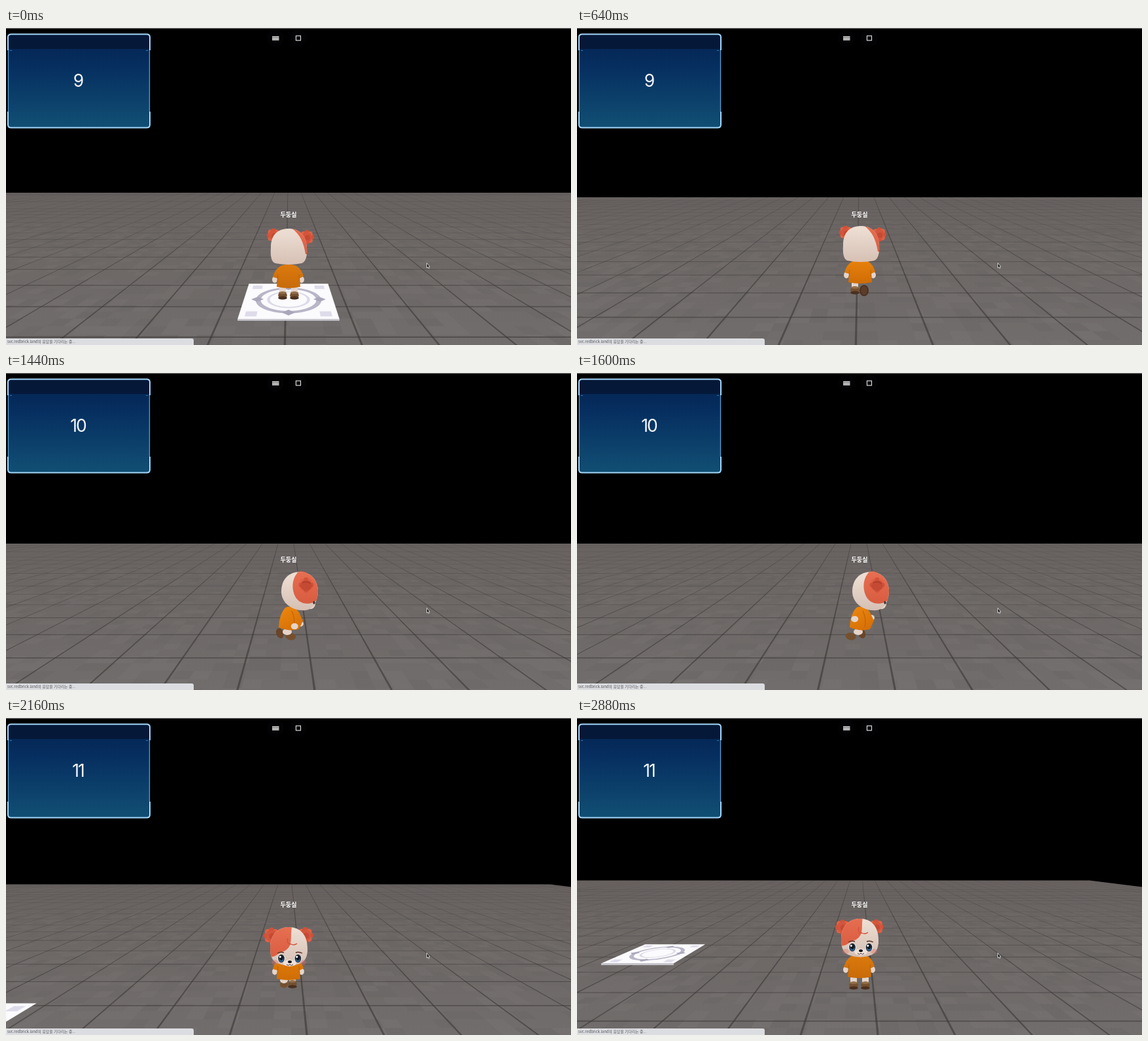
Write an HTML page with a canvas that moves like this. It is 864 px wide and 485 px high and loops after 2960 ms.

```html
<!DOCTYPE html>
<html lang="ko">
<head>
<meta charset="utf-8">
<title>Runner</title>
<style>
html, body { margin: 0; width: 100%; height: 100%; overflow: hidden; background: #000; }
#stage { position: relative; width: 864px; height: 485px; overflow: hidden; font-family: "Noto Sans CJK KR", "Noto Sans CJK", sans-serif; }
canvas, svg { position: absolute; left: 0; top: 0; }
#count { font: 400 26.5px Inter, sans-serif; fill: #f4f7fb; text-anchor: middle; letter-spacing: -2px; }
#name { position: absolute; left: 392px; top: 279px; width: 80px; text-align: center; font-size: 9px; line-height: 13px; font-weight: 700; color: #fff; }
#status { position: absolute; left: 0; top: 475px; width: 285px; height: 10px; padding-left: 2px; background: #dcdde1; border-radius: 0 3px 0 0; font-size: 5.8px; line-height: 10px; color: #55565a; white-space: nowrap; }
</style>
</head>
<body>
<div id="stage">
<canvas id="scene" width="864" height="485"></canvas>
<svg width="864" height="485">
  <defs>
    <linearGradient id="glass" x2="0" y2="1">
      <stop stop-color="#04224f"/><stop offset=".35" stop-color="#062f60"/><stop offset="1" stop-color="#114f74"/>
    </linearGradient>
  </defs>
  <path d="M0 .5H864" stroke="#777"/>
  <rect x="3" y="9" width="217" height="144" rx="5" fill="url(#glass)"/>
  <path d="M3 32V14Q3 9 8 9H215Q220 9 220 14V32Z" fill="#051838"/>
  <path d="M3.5 32V128M219.5 32V128" stroke="#5aa0d4" stroke-width="1.3"/>
  <path d="M3 34V14Q3 9.500 8 9.500H215Q220 9.500 220 14V34M3 128V148Q3 152.500 8 152.500H215Q220 152.500 220 148V128" fill="none" stroke="#a5d8fb" stroke-width="2"/>
  <path d="M6 34.500H9M214 34.500H217" stroke="#2e79b5"/>
  <text id="count" x="110" y="90">9</text>
  <g fill="#030305"><circle cx="412" cy="15.500" r="13"/><circle cx="447" cy="15.500" r="13"/></g>
  <path d="M407 13.500H417.500M407 15.700H417.500M407 17.900H417.500" stroke="#fff" stroke-width="1.5"/>
  <rect x="443.500" y="12" width="7" height="7" fill="none" stroke="#ddd" stroke-width="1.2"/>
  <path d="M643.500 359.500V367L645 365.700L646 368L647.300 367.400L646.300 365.200H648Z" fill="#111" stroke="#fff" stroke-width=".7"/>
</svg>
<div id="name">두둥실</div>
<div id="status">svc.redbrick.land의 응답을 기다리는 중...</div>
</div>
<script>
const ctx = document.getElementById('scene').getContext('2d');
const count = document.getElementById('count');
const LOOP = 2960, STEP = 80, SPEED = 0.0023;
const FOCAL = 540, VANISH = 204, DIST = 2.56, CELL = 0.42, EDGE = 8.69, SIDE = 9.9;
const CREAM = '#e5d4c9', SHADE = '#cbb4a8', RED = '#df6246', DARK_RED = '#c44a33', BOOT = '#75502f', SOLE = '#4a3020';
const clamp = (v, lo, hi) => Math.max(lo, Math.min(hi, v));
let camX = 0, camZ = 0;

// Floor point to screen
function project(x, z) {
  const depth = Math.max(0.05, z - camZ + DIST);
  return [432 + FOCAL * (x - camX) / depth, VANISH + FOCAL / depth];
}
function poly(points, fill) {
  ctx.beginPath();
  points.forEach(([x, z]) => ctx.lineTo(...project(x, z)));
  ctx.closePath();
  ctx.fillStyle = fill;
  ctx.fill();
}
const quad = (x, z, w, d, fill) => poly([[x, z], [x + w, z], [x + w, z + d], [x, z + d]], fill);
function noise(i, j) {
  const n = Math.sin(i * 127.1 + j * 311.7) * 43758.5453;
  return n - Math.floor(n);
}

function floor() {
  const near = camZ - DIST + 1.8;
  ctx.save();
  ctx.beginPath();
  [[-SIDE, near], [-SIDE, EDGE], [SIDE, EDGE], [SIDE, near]].forEach(([x, z]) => ctx.lineTo(...project(x, z)));
  ctx.clip();
  const tone = ctx.createLinearGradient(0, 250, 0, 485);
  tone.addColorStop(0, '#676160');
  tone.addColorStop(0.35, '#6c6765');
  tone.addColorStop(1, '#716d6c');
  ctx.fillStyle = tone;
  ctx.fillRect(0, 240, 864, 245);

  const sub = CELL / 4;
  for (let j = Math.floor(near / sub); j * sub < near + 4; j++) {
    const reach = (j * sub - camZ + DIST) * 0.82 + sub;
    for (let i = Math.floor((camX - reach) / sub); i * sub < camX + reach; i++) {
      const n = noise(i, j);
      if (n > 0.75) quad(i * sub, j * sub, sub, sub, 'rgba(255,240,230,.02)');
      else if (n < 0.2) quad(i * sub, j * sub, sub, sub, 'rgba(20,15,15,.025)');
    }
  }
  const phase = 0.28;
  for (let k = Math.floor((near - phase) / CELL); k * CELL < EDGE; k++) {
    quad(camX - SIDE * 2, k * CELL + phase, SIDE * 4, 0.017, 'rgba(52,48,47,.45)');
  }
  for (let x = -23 * CELL - 0.02; x < SIDE; x += CELL) {
    quad(x - 0.006, near, 0.012, EDGE - near, 'rgba(58,54,53,.6)');
  }
  ctx.restore();
}

function ring(r, width, fill) {
  ctx.beginPath();
  for (const radius of [r, r - width]) {
    for (let i = 0; i <= 48; i++) {
      const a = i * Math.PI / 24;
      const p = project(radius * Math.cos(a), radius * Math.sin(a));
      i ? ctx.lineTo(...p) : ctx.moveTo(...p);
    }
  }
  ctx.fillStyle = fill;
  ctx.fill('evenodd');
}
function pad() {
  const h = 0.323;
  const [x, y] = project(-h, -h), [right] = project(h, -h);
  if (y > 640) return;
  ctx.fillStyle = '#c5c4cc';
  ctx.fillRect(x, y, right - x, 2.5);
  quad(-h, -h, 2 * h, 2 * h, '#fbfafd');
  for (const sx of [-1, 1]) for (const sz of [-1, 1]) quad(sx * 0.245 - 0.038, sz * 0.245 - 0.038, 0.076, 0.076, '#dedbea');
  ring(0.237, 0.036, '#b9b6c8');
  ring(0.155, 0.02, '#dddae8');
  for (const [cx, cz] of [[0, 0.225], [0, -0.225], [0.225, 0], [-0.225, 0]]) {
    poly([[cx - 0.045, cz], [cx, cz + 0.045], [cx + 0.045, cz], [cx, cz - 0.045]], '#aaa7bb');
  }
}

function oval(x, y, rx, ry, fill, turn = 0) {
  ctx.beginPath();
  ctx.ellipse(x, y, rx, ry, turn, 0, 7);
  ctx.fillStyle = fill;
  ctx.fill();
}
function shape(d, fill) {
  ctx.fillStyle = fill;
  ctx.fill(new Path2D(d));
}
function line(d, color, width) {
  ctx.strokeStyle = color;
  ctx.lineWidth = width;
  ctx.stroke(new Path2D(d));
}
// Draws moved by (x, y) and turned about the middle of the body
function shifted(x, y, draw, turn = 0) {
  ctx.save();
  ctx.translate(432 + x, 380 + y);
  ctx.rotate(turn);
  ctx.translate(-432, -380);
  draw();
  ctx.restore();
}
function blend(x0, y0, x1, y1, from, to) {
  const g = ctx.createLinearGradient(x0, y0, x1, y1);
  g.addColorStop(0, from);
  g.addColorStop(1, to);
  return g;
}
function ear(x, y, r) {
  for (let i = 0; i < 8; i++) {
    const a = i * Math.PI / 4;
    oval(x + r * 0.68 * Math.cos(a), y + r * 0.68 * Math.sin(a), r * 0.36, r * 0.36, i % 2 ? RED : '#d05139');
  }
  oval(x, y, r * 0.75, r * 0.75, '#d3553b');
  oval(x + 1, y + 1, r * 0.4, r * 0.4, DARK_RED);
}
function head(d, patch, drop = 0) {
  const outline = new Path2D(d);
  ctx.save();
  ctx.fillStyle = blend(0, 312, 0, 366, '#ecddd2', '#d5beb2');
  ctx.fill(outline);
  ctx.clip(outline);
  ctx.translate(0, drop);
  shape(patch, blend(0, 305, 0, 350, '#e76e51', '#d95d41'));
  ctx.restore();
}
function shirt(top = '#e8820c', bottom = '#cf6c06') {
  oval(411, 385, 4, 5, CREAM);
  oval(452, 385, 4, 5, CREAM);
  shape('M420 364Q432 359 444 364Q452 369 455 380L449 383L450 396Q432 400 414 396L415 383L408 381Q411 369 420 364Z', blend(0, 362, 0, 398, top, bottom));
  line('M416 377L415 388M448 377L449 388', '#b65c08', 0.8);
}
function boot(x, y) {
  ctx.fillStyle = CREAM;
  ctx.fillRect(x - 5, y - 12, 10, 9);
  oval(x, y, 6.8, 5.8, BOOT);
  oval(x, y + 4, 6.8, 2.5, SOLE);
  oval(x, y - 4, 6, 1.8, '#94704c');
}

function backHead() {
  ear(409, 317, 10);
  ear(460, 320, 10.5);
  head('M405 336C405 316 416 307 432 307S459 316 460 336C461 350 458 358 452 360Q432 364 412 360C406 358 404 350 405 336Z',
    'M433 304C447 312 455 325 458 346L472 346V300Z');
}
function back(run, s) {
  if (!run) {
    boot(423, 409);
    boot(441, 409);
    shirt('#dd7a0d', '#c76a0a');
    backHead();
    return;
  }
  const side = s < 0 ? -1 : 1, lift = Math.abs(s);
  boot(432 - side * 7, 401);
  shifted(1, -7, () => shirt());
  oval(432 + side * 7, 402 - lift, 7, 8 + 2 * lift, SOLE);
  oval(432 + side * 7, 402 - lift, 5, 6 + 2 * lift, '#5c3d29');
  shifted(2, -4, backHead);
}

function sideView(s, bob) {
  const swing = 9 * s;
  oval(427 - swing, 400 - 2 * Math.abs(s), 5.5, 8, '#6a4527', -0.35);
  oval(427 + swing, 403, 8, 5.5, BOOT, 0.2);
  oval(430, 396, 7, 5, CREAM);
  oval(450, 379 + 5 * s, 5, 4.5, CREAM);
  shape('M427 359Q440 354 448 366L454 379L448 392Q432 396 417 389Q418 369 427 359Z', blend(420, 360, 440, 395, '#ec860e', '#d56f05'));
  line('M437 364Q443 376 440 389', '#b95f08', 1);
  oval(433 + 9 * s, 382 + 6 * s, 5.5, 4.8, CREAM);
  shifted(0, bob, () => {
    oval(452, 308, 8, 4, DARK_RED);
    oval(465, 354, 8, 8, CREAM);
    head('M421 335C421 316 433 305 449 305C466 305 476 317 477 333C477 351 469 364 455 364C435 364 421 351 421 335Z',
      'M450 302C438 312 436 327 441 340C446 352 457 356 469 352L482 345V300Z');
    ear(459, 325, 11);
    oval(459, 326, 9, 8, DARK_RED);
    line('M453 322Q459 318 466 323', '#ac3c2b', 1.3);
    oval(471, 352, 1.5, 2.5, '#392d30');
  });
}

function eye(x, y) {
  oval(x, y, 5.8, 6.5, '#f7f1ee');
  oval(x, y, 4.8, 6.2, '#17222f');
  oval(x, y + 2, 3.2, 3.3, '#2f6c9b');
  oval(x, y, 2.3, 3, '#0d141d');
  oval(x - 1.7, y - 2.6, 1.5, 1.7, '#fff');
}
function face() {
  line('M431 320Q429 330 436 329M434 328Q440 332 445 328', '#d25237', 1.5);
  oval(411, 357, 5, 4, 'rgba(225,112,105,.38)');
  oval(454, 357, 5, 4, 'rgba(225,112,105,.38)');
  eye(421, 351);
  eye(446.5, 351);
  line('M415 343Q420 340 425 342M443 342Q448 340 453 343', '#5c3029', 1.4);
  oval(434, 358, 10, 5, '#eee1da');
  oval(434, 356, 3, 2, '#171719');
  line('M429 360Q431.500 363 434 360Q436.500 363 439 360', '#4c3635', 1);
}
function frontHead(nod) {
  ear(406, 320, 11 + nod / 4);
  ear(457.5, 319.5, 11 + nod / 4);
  head('M404 339C404 317 417 307 433 307S461 318 461 339C462 354 455 361 449 363Q433 369 417 363C408 360 404 353 404 339Z',
    'M398 298H438C434 316 438 325 433 333C428 341 421 340 416 344C410 349 406 348 398 350Z', nod);
  shifted(0, nod, face);
}
function front(run, s, bob) {
  if (!run) {
    boot(423, 409);
    boot(441, 409);
    shirt('#dd7a0d', '#c86b08');
    frontHead(0);
    return;
  }
  const side = s < 0 ? -1 : 1, lift = Math.abs(s);
  const raised = 432 + side * 7;
  oval(raised, 408 - 8 * lift, 6, 5, lift > 0.5 ? SHADE : BOOT);
  oval(raised, 401 - 2 * lift, 6, 5, CREAM);
  boot(431 - side * 7 + 3 * s, 407);
  shifted(s, 1 + bob * 2, () => shirt('#e17c0a', '#cf6d06'), s * 0.14);
  shifted(3.5 * s, 9.5 + bob * 3.5, () => frontHead(4));
}

function render(t) {
  camX = clamp((t - 780) * SPEED, 0, 1.98);
  camZ = t < 1630 ? clamp((t - 20) * SPEED, 0, 1.78) : Math.max(-0.91, 1.78 - (t - 1630) * SPEED);
  count.textContent = 9 + Math.floor((t + 80) / 1000);
  ctx.clearRect(0, 0, 864, 485);
  floor();
  pad();

  const stride = 2 * Math.PI * (t - 1840) / 427;
  const swing = Math.cos(stride), bob = -Math.cos(2 * stride);
  if (t < 800) back(t >= 80, swing);
  else if (t < 1640) sideView(swing, bob);
  else front(t < 2800, swing, bob);
}

const start = performance.now();
let last = -1;
function tick(now) {
  const t = Math.floor(Math.max(0, now - start) % LOOP / STEP) * STEP;
  if (t !== last) render(last = t);
  requestAnimationFrame(tick);
}
tick(start);
</script>
</body>
</html>
```
